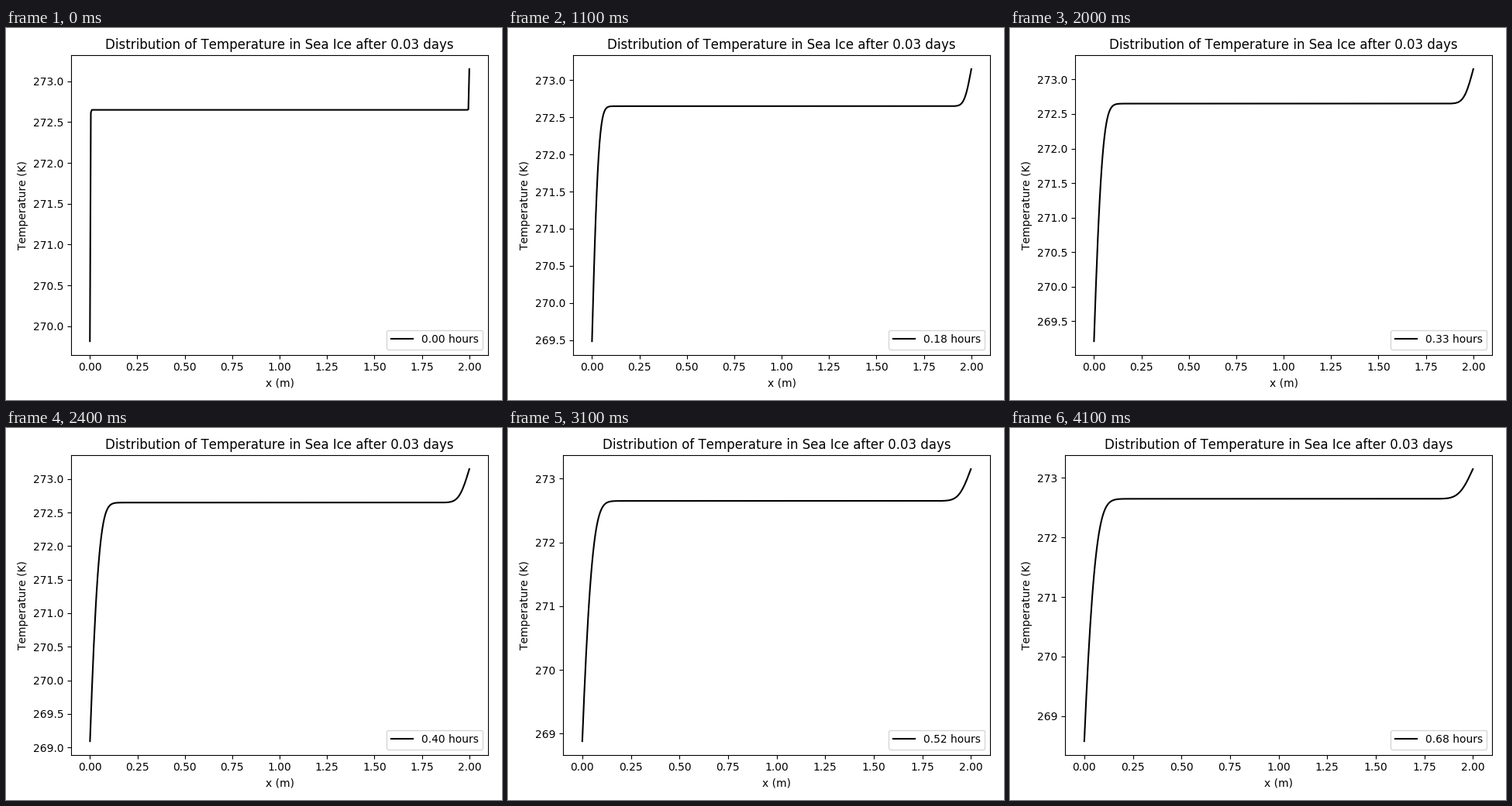
A matplotlib script for the animation above (4200 ms loop, 640x480 px).

```python
import matplotlib.pyplot as plt
import numpy as np
from matplotlib.animation import FuncAnimation

WIDTH, HEIGHT, DPI = 640, 480, 100
RIGHT, TOP = 622.3, 35.4   # plot area edges in pixels
FRAMES = 42                # one per simulated minute
INTERVAL = 100             # ms

LENGTH = 2.0               # m
CELLS = 400
DT = 0.5                   # s
DIFFUSIVITY = 6.3e-7       # m^2/s
STEPS_PER_FRAME = int(60 / DT)

T_ICE = 272.65
T_BOTTOM = 273.15
T_SURFACE = 269.816
COOLING = 0.0302 / 60      # K/s

x = np.linspace(0, LENGTH, CELLS + 1)


def simulate():
    """Explicit heat diffusion, keeping one profile per minute."""
    ratio = DIFFUSIVITY * DT / (x[1] - x[0]) ** 2
    temp = np.full(CELLS + 1, T_ICE)
    temp[-1] = T_BOTTOM
    profiles = []
    for step in range((FRAMES - 1) * STEPS_PER_FRAME + 1):
        temp[0] = T_SURFACE - COOLING * step * DT
        temp[1:-1] += ratio * np.diff(temp, 2)
        if step % STEPS_PER_FRAME == 0:
            profiles.append(temp.copy())
    return profiles


profiles = simulate()
plt.rcParams["text.kerning_factor"] = 6  # whole-pixel letter spacing
fig, ax = plt.subplots(figsize=(WIDTH / DPI, HEIGHT / DPI), dpi=DPI)


def update(frame):
    ax.clear()
    ax.plot(x, profiles[frame], color="black", label=f"{frame / 60:.2f} hours")
    ax.set_title("Distribution of Temperature in Sea Ice after 0.03 days")
    ax.set_xlabel("x (m)")
    ax.set_ylabel("Temperature (K)")
    ax.legend(loc="lower right")
    # Left and bottom follow the labels; right and top stay fixed.
    fig.tight_layout()
    fig.subplots_adjust(right=RIGHT / WIDTH, top=1 - TOP / HEIGHT)
    return ax.lines


anim = FuncAnimation(fig, update, frames=FRAMES, interval=INTERVAL,
                     repeat=True, repeat_delay=0, blit=False)
plt.show()
```
